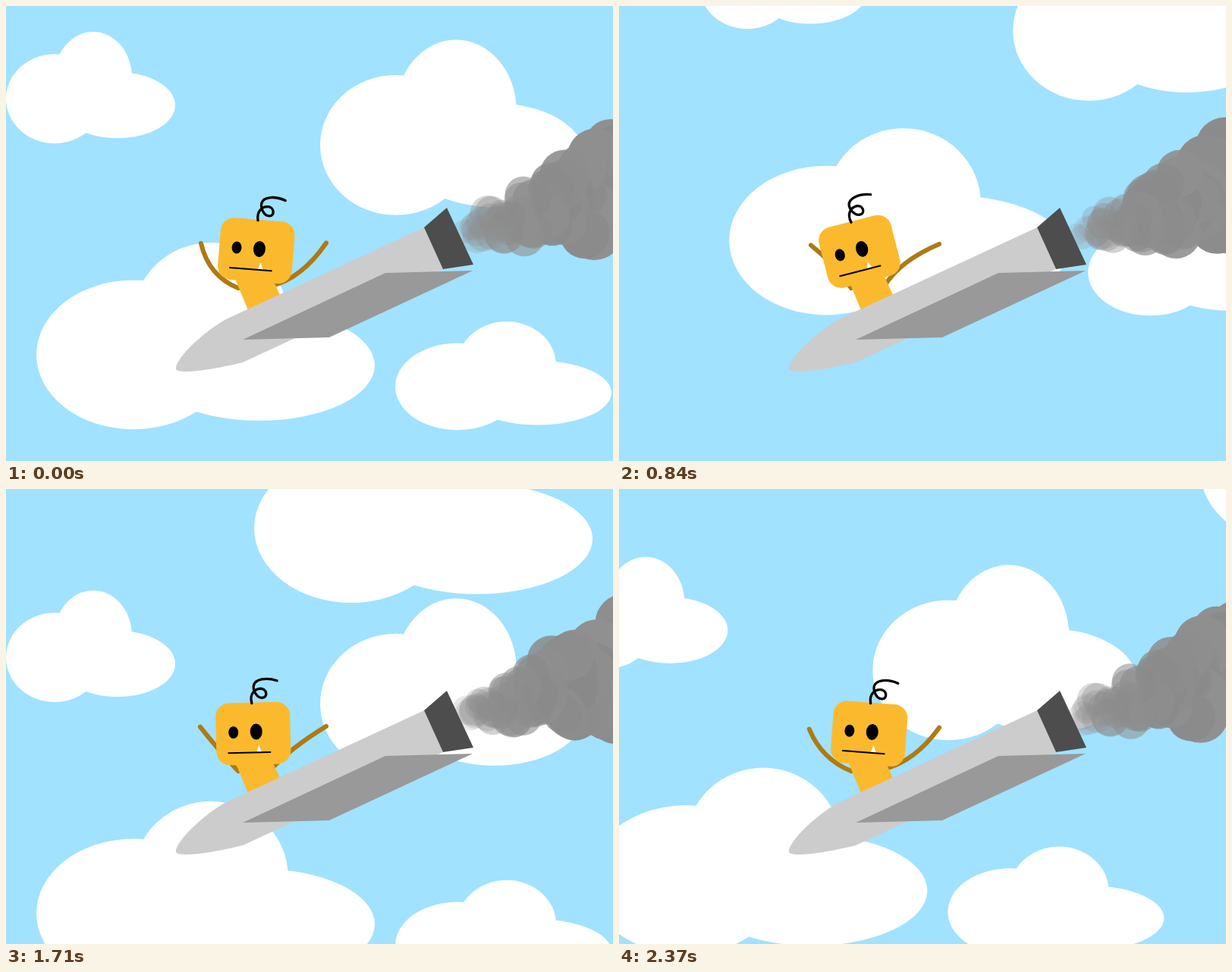
Write an HTML page with a canvas that moves like this. It is 800 by 600 pixels and loops after 2.4 s.

```html
<!DOCTYPE html>
<html lang="en">
<head>
<meta charset="utf-8">
<title>Rocket ride</title>
<style>
  html, body { margin: 0; height: 100%; overflow: hidden; background: #a0e2ff; }
  canvas { display: block; }
</style>
</head>
<body>
<canvas id="stage" width="800" height="600"></canvas>
<script>
const ctx = document.getElementById('stage').getContext('2d');
const STEP = 30, STEPS = 80, TAU = Math.PI * 2;
const YELLOW = '#fbba2d';

// Cloud boxes: x, y, width, height
const CLOUDS = [[0, 34, 223, 147], [414, 44.5, 348, 231], [40, 312, 446, 246], [513, 416, 285, 143]];
// Ellipses inside a unit cloud: cx, cy, rx, ry
const PUFFS = [[.287, .601, .287, .4], [.515, .402, .2285, .402], [.659, .658, .341, .2965]];
// Where the group of four clouds stands along the flight, and the flight per step
const SKY = [
  [0, 0], [-1018, 164], [-359, 827], [-1524, 780], [-2125, 1406], [-2392, 2183],
  [-3309, 2128], [-3261, 2769], [-4253, 2761], [-4540, 3269], [-5517, 3212], [-5566, 3909]
];
const FLIGHT = { x: 79.65, y: -55.6 };

const BODY = new Path2D('M551 292L576 347L312 470C270 480 229 486 224 479C221 469 254 434 288 414Z');
const NOZZLE = new Path2D('M581 266L616 341L576 347L551 292Z');
const FIN = new Path2D('M312 440L500 352L615 349L426 437Z');
const NECK = new Path2D('M300 355L319 401L361 381L349 355Z');
const HAIR = new Path2D('M-1 -79C-4 -92 4 -98 11 -98C19 -98 21 -87 14 -86C6 -85 1 -96 2 -102C4 -111 19 -113 33 -108');
const TOOTH = new Path2D('M4 -14L7 -24L11 -14Z');

const mix = (a, b, u) => a + (b - a) * u;

function random(seed, salt) {
  const v = Math.sin(seed * 127.1 + salt * 311.7) * 43758.5453;
  return v - Math.floor(v);
}

function fill(color, path) {
  ctx.fillStyle = color;
  ctx.fill(path);
}

function stroke(color, width, path) {
  ctx.strokeStyle = color;
  ctx.lineWidth = width;
  ctx.stroke(path);
}

function ellipse(x, y, rx, ry, color) {
  ctx.fillStyle = color;
  ctx.beginPath();
  ctx.ellipse(x, y, rx, ry, 0, 0, TAU);
  ctx.fill();
}

function drawClouds(n) {
  for (const flown of [n, n - STEPS])
    for (const [left, top] of SKY) {
      const dx = left + FLIGHT.x * flown, dy = top + FLIGHT.y * flown;
      if (Math.abs(dx) > 800 || Math.abs(dy) > 600) continue;
      for (const [x, y, w, h] of CLOUDS)
        for (const [cx, cy, rx, ry] of PUFFS)
          ellipse(dx + x + cx * w, dy + y + cy * h, rx * w, ry * h, '#fff');
    }
}

function drawSmoke(n) {
  const life = 24, perStep = 3;
  for (let age = life; age >= 0; age--) {
    const birth = (n - age + STEPS) % STEPS, s = age / life;
    for (let j = 0; j < perStep; j++) {
      const r = salt => random(birth * perStep + j + 1, salt);
      const x = 612 + 210 * s + (r(1) - .5) * 20;
      const y = 308 - 10 * s - (22 + 105 * s) * r(2);
      const radius = 13 + 8 * r(3) + 22 * s;
      const gray = 138 + Math.round(r(4) * 6);
      ellipse(x, y, radius, radius, `rgba(${gray},${gray},${gray},${Math.min(1, .2 + 1.2 * s)})`);
    }
  }
}

function drawArms(phase) {
  const half = (1 - Math.cos(phase)) / 2;
  const bend = half * half * (3 - 2 * half);
  const flap = .5 + .5 * Math.sin(14 * phase);
  const arms = new Path2D();
  arms.moveTo(306, 372);
  arms.quadraticCurveTo(mix(267, 285, bend), mix(356, 337, bend), mix(250, 264, flap), mix(317, 309, flap));
  arms.moveTo(350, 369);
  arms.quadraticCurveTo(mix(390, 368, bend), mix(359, 333, bend), 422, mix(315, 310, flap));
  stroke('#ae7a14', 6, arms);
}

function drawHead(phase) {
  const degrees = -3.4 + 8 * Math.cos(4 * phase) + 6 * Math.sin(phase) * Math.sin(2 * phase);
  ctx.save();
  ctx.translate(326.7, 361.5);
  ctx.rotate(degrees * TAU / 360);
  const face = new Path2D();
  face.roundRect(-49, -80, 98, 82, 18);
  fill(YELLOW, face);
  ellipse(-26, -41, 6.5, 8, '#000');
  ellipse(4, -41.5, 8, 10.5, '#000');
  fill('#fff', TOOTH);
  stroke('#000', 2, new Path2D('M-33 -14H22'));
  stroke('#000', 3.3, HAIR);
  ctx.restore();
}

function draw() {
  const n = Math.floor(performance.now() / STEP) % STEPS;
  const phase = TAU * n / STEPS;
  ctx.fillStyle = '#a0e2ff';
  ctx.fillRect(0, 0, 800, 600);
  ctx.lineCap = 'round';
  drawClouds(n);
  drawSmoke(n);
  drawArms(phase);
  fill(YELLOW, NECK);
  drawHead(phase);
  fill('#ccc', BODY);
  fill('#4d4d4d', NOZZLE);
  fill('#999', FIN);
  requestAnimationFrame(draw);
}
draw();
</script>
</body>
</html>
```
